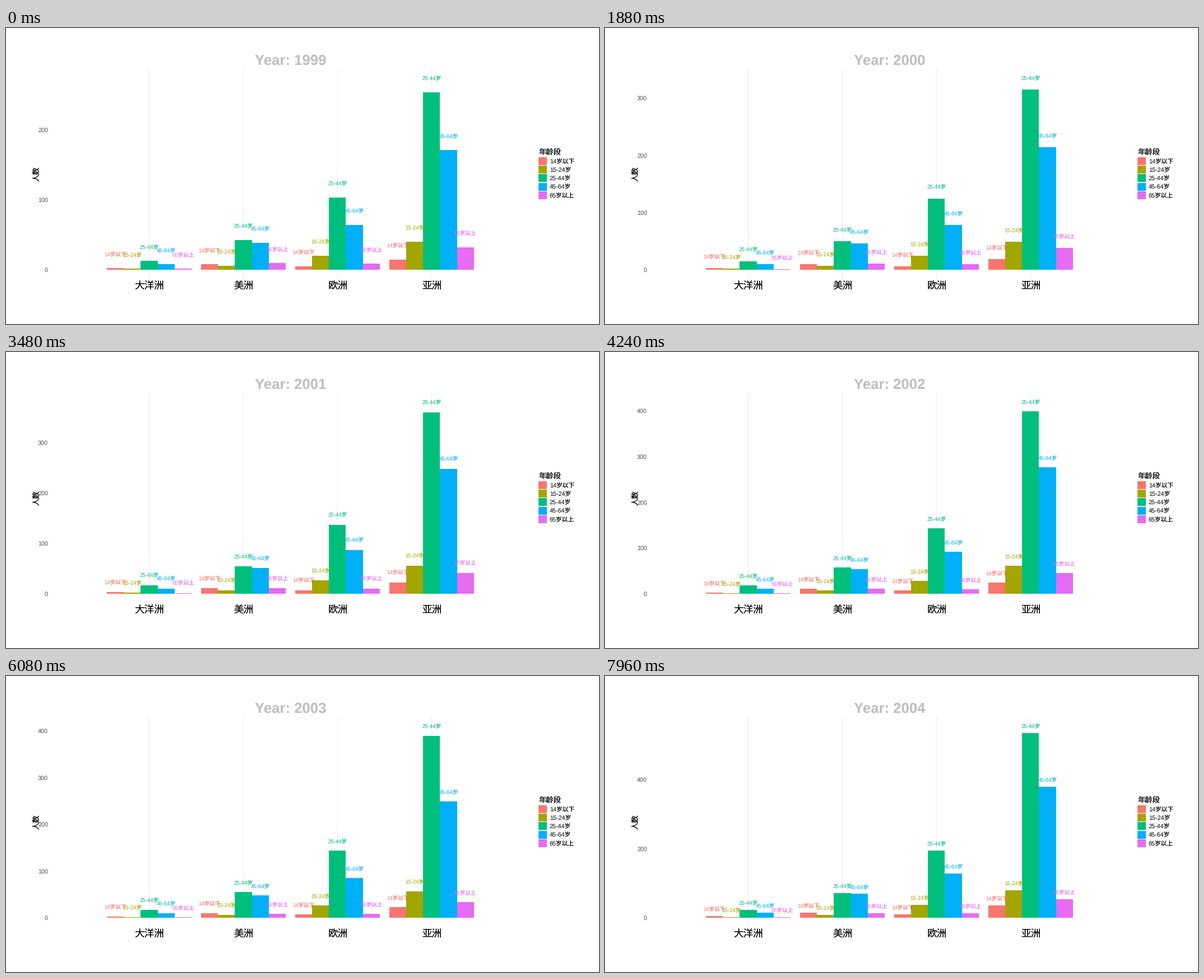
Recreate the animation shown at these times as a matplotlib script. Size 1058 px wide and 529 px high, loop 8000 ms.

```python
import numpy as np
import matplotlib.pyplot as plt
from matplotlib.animation import FuncAnimation
from matplotlib.patches import Rectangle

W, H, DPI = 1058, 529, 100
FRAMES, INTERVAL = 200, 40
FRAMES_PER_YEAR = 40
FIRST_YEAR, SPAN = 1999, 5

LATIN = "Liberation Sans"
MIXED = [LATIN, "Noto Sans CJK JP"]

REGIONS = ["大洋洲", "美洲", "欧洲", "亚洲"]
AGES = ["14岁以下", "15-24岁", "25-44岁", "45-64岁", "65岁以上"]
COLORS = ["#F8766D", "#A3A500", "#00BF7D", "#00B0F6", "#E76BF3"]

# Visitors in the first year, per region and age band.
START = np.array([[2.0, 1.3, 12.6, 7.8, 1.2],
                  [7.8, 5.5, 42.3, 38.6, 9.2],
                  [4.8, 20.3, 102.8, 64.0, 8.4],
                  [14.7, 39.8, 252.5, 170.2, 32.2]])

# Log growth over the span is a region part plus an age part.
REGION_GROWTH = np.array([0.60, 0.53, 0.64, 0.75])
AGE_GROWTH = np.array([0.14, -0.05, 0.0, 0.05, -0.23])
SURGE = np.array([0.03, 0.04, -0.02, 0.07])            # fourth year
DIP = np.array([-0.33, -0.24, -0.185, -0.30, -0.48])   # fifth year

BASE, TOP = 432, 90            # pixel rows of zero and of the highest label
PANEL_TOP, PANEL_BOTTOM = 73, 449
LEFT, GROUP_STEP = 180, 167.9
BAR_W = GROUP_STEP * 0.9 / len(AGES)
LABEL_GAP = 20                 # in data units
LABEL_PX, TICK_PX = 9.6, 10.8


def yearly_values():
    """Steady growth with a ripple, as (year, region, age)."""
    growth = REGION_GROWTH[:, None] + AGE_GROWTH
    flat = np.zeros_like(growth)
    ripple = [flat, flat + 0.045, flat + 0.01,
              flat + SURGE[:, None], flat + DIP, flat]
    return np.array([START * np.exp(growth * y / SPAN + r)
                     for y, r in enumerate(ripple)])


VALUES = yearly_values()

plt.rcParams["text.hinting"] = "none"
fig = plt.figure(figsize=(W / DPI, H / DPI), dpi=DPI, facecolor="white")
ax = fig.add_axes([0, 0, 1, 1])
ax.set_xlim(0, W)
ax.set_ylim(H, 0)
ax.axis("off")


def baseline(mid, px):
    """Baseline row of text whose digits are centred on a row."""
    return mid + 0.37 * px


def put(x, mid, text, px, color="black", font=MIXED, ha="center", weight=350):
    return ax.text(x, baseline(mid, px), text, fontsize=px * 72 / DPI,
                   color=color, family=font, ha=ha, va="baseline",
                   weight=weight)


def box(x, y, w, h, color):
    return ax.add_patch(Rectangle((x, y), w, h, fc=color, lw=0,
                                  snap=True, zorder=2))


for g, region in enumerate(REGIONS):
    x = LEFT + g * GROUP_STEP + 2.5 * BAR_W
    ax.plot([x, x], [PANEL_TOP, PANEL_BOTTOM], color="#EBEBEB", lw=0.75,
            solid_capstyle="butt", snap=False, zorder=1)
    put(x + 0.6, 459.5, region, 17.6)

ax.text(55.5, 260.5, "人数", fontsize=13.3 * 72 / DPI, family=MIXED,
        weight=350, rotation=90, ha="center", va="center")

put(950.6, 221, "年龄段", 13.3, ha="left")
for k, (age, color) in enumerate(zip(AGES, COLORS)):
    mid = 237.9 + 15.2 * k
    box(950.4, mid - 7, 14.1, 14.1, color)
    put(969.9, mid, age, 10.7, ha="left")

title = put(507.9, 56.6, "", 25.7, "#BEBEBE", LATIN, weight="bold")
ticks = [put(75, BASE, "", TICK_PX, "#4D4D4D", LATIN, "right", "normal")
         for _ in range(7)]

bars, labels = [], []
for g in range(len(REGIONS)):
    for k, (age, color) in enumerate(zip(AGES, COLORS)):
        x = LEFT + g * GROUP_STEP + k * BAR_W
        bars.append(box(x, BASE, BAR_W, 0, color))
        labels.append(put(x + BAR_W / 2, BASE, age, LABEL_PX, color))


def draw(i):
    t = (i + 1) / FRAMES_PER_YEAR
    year = min(int(t), SPAN - 1)
    part = t - year
    values = ((1 - part) * VALUES[year] + part * VALUES[year + 1]).ravel()
    limit = values.max() + LABEL_GAP
    scale = (BASE - TOP) / limit

    title.set_text(f"Year: {int(FIRST_YEAR + t + 0.5)}")

    for bar, label, v in zip(bars, labels, values):
        bar.set_y(BASE - v * scale)
        bar.set_height(v * scale)
        label.set_y(baseline(BASE - (v + LABEL_GAP) * scale, LABEL_PX))

    step = 200 if limit > 527 else 100
    for n, tick in enumerate(ticks):
        v = n * step
        tick.set_visible(v <= limit * 1.05)
        tick.set_text(str(v))
        tick.set_y(baseline(BASE - v * scale, TICK_PX))

    return [title, *bars, *labels, *ticks]


anim = FuncAnimation(fig, draw, frames=FRAMES, interval=INTERVAL,
                     repeat=True, repeat_delay=0)
plt.show()
```
